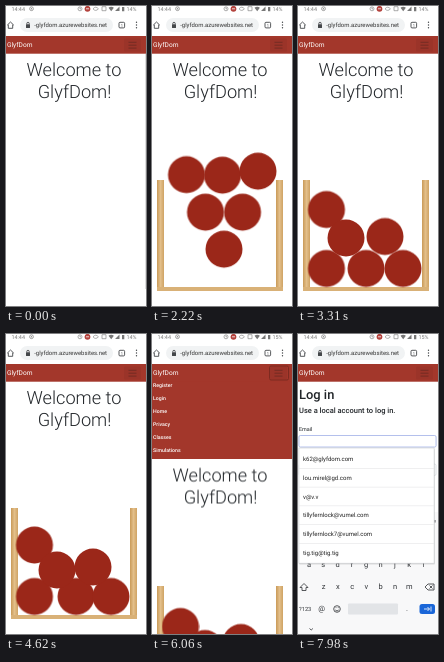
An HTML page for the animation above (8000 ms loop, 140 by 300 pixels).

```html
<!DOCTYPE html>
<html lang="en">
<head>
<meta charset="utf-8">
<title>GlyfDom</title>
<style>
  html, body { margin: 0; width: 100%; height: 100%; overflow: hidden; background: #fff; }
  svg { display: block; width: 140px; height: 300px; font-family: Roboto, sans-serif; text-rendering: geometricPrecision; }
  .line { fill: none; stroke: #44474a; stroke-width: .9; }
  .field { fill: #fff; stroke: #ced4da; stroke-width: .7; }
  .title { font-size: 18.2px; font-weight: 300; fill: #212529; text-anchor: middle; }
  .menu { font-size: 5.2px; font-weight: 500; fill: #fff; }
  .label { font-size: 5.4px; fill: #212529; }
  .mail { font-size: 6px; fill: #222; }
  .key { font-size: 7.5px; fill: #33363a; text-anchor: middle; }
  .status { font-size: 5.4px; fill: #777; }
</style>
</head>
<body>
<svg viewBox="0 0 140 300">
  <defs>
    <linearGradient id="wood">
      <stop offset="0" stop-color="#c99a58"/>
      <stop offset=".5" stop-color="#e3bf8a"/>
      <stop offset="1" stop-color="#cfa364"/>
    </linearGradient>
  </defs>
  <rect width="140" height="300" fill="#fff"/>

  <g id="home">
    <g id="content">
      <text class="title" x="68" y="70">Welcome to</text>
      <text class="title" x="68.5" y="92">GlyfDom!</text>
      <g id="sim">
        <rect x="5" y="174" width="7" height="111" fill="url(#wood)"/>
        <rect x="124" y="174" width="7" height="111" fill="url(#wood)"/>
        <rect x="5" y="281" width="126" height="4" fill="#d9b177"/>
        <g id="balls" fill="#9b2719"></g>
      </g>
    </g>
    <g id="drawer">
      <rect y="-48" width="140" height="95" fill="#a3372b"/>
      <g id="menu" class="menu"></g>
    </g>
    <rect id="scrollbar" x="139" y="48" width="1" height="235" fill="#ddd"/>
  </g>

  <g id="login">
    <rect y="28" width="140" height="272" fill="#fff"/>
    <text x="1" y="65.2" font-size="12.900" font-weight="500" fill="#212529">Log in</text>
    <text x="1" y="78.500" font-size="7.500" font-weight="500" fill="#212529">Use a local account to log in.</text>
    <text class="label" x="1" y="97">Email</text>
    <rect class="field" x="1" y="101.500" width="137" height="11.500" rx="1.500"/>
    <text class="label" x="1" y="125">Password</text>
    <rect class="field" x="1" y="130" width="137" height="11.500" rx="1.500"/>
    <rect class="field" x="1.500" y="148" width="4" height="4" rx=".8"/>
    <text class="label" x="8" y="152">Remember me?</text>
    <rect x="1" y="159" width="22" height="12" rx="1.500" fill="#a3372b"/>
    <text class="menu" x="5" y="167">Log in</text>
    <g id="focus">
      <rect x="1" y="101.500" width="137" height="11.500" rx="1.500" fill="#fff" stroke="#a5b4ea" stroke-width=".8"/>
      <rect id="caret" x="5" y="105" width=".8" height="6" fill="#222"/>
    </g>
    <g id="keyboard">
      <rect y="178" width="140" height="122" fill="#f8f8f9"/>
      <g id="keys" class="key"></g>
      <path class="line" d="M2 253.500l4-4 4 4H8v3H4v-3zM127 253l3-3h6v6h-6zM131.500 251.500l3 3m0-3l-3 3"/>
      <text x="1" y="277.300" font-size="5.700" fill="#33363a">?123</text>
      <circle class="line" cx="39" cy="275" r="3.300"/>
      <path class="line" d="M37.300 276q1.700 2 3.400 0M37.600 273.600h.8m1.400 0h.8"/>
      <rect x="50" y="269.500" width="50" height="11" rx="1" fill="#e2e4e7"/>
      <rect x="121.500" y="270" width="15.500" height="10" rx="2.500" fill="#1a66d8"/>
      <path d="M126 275h5.500m-2-2l2 2-2 2m3.500-4.500v5" fill="none" stroke="#fff" stroke-width=".8"/>
      <path class="line" d="M11.500 294.500l1.700 1.500 1.700-1.500M137 186v2.500"/>
    </g>
    <g id="suggest">
      <rect x="1" y="115" width="136" height="115.500" rx="1" fill="#000" opacity=".12"/>
      <rect x=".9" y="114" width="135.200" height="115.200" fill="#fff" stroke="#c9ccd0" stroke-width=".6"/>
      <g id="mails" class="mail"></g>
    </g>
  </g>

  <rect width="140" height="30" fill="#fff"/>
  <g id="bar">
    <rect y="30" width="140" height="17.700" fill="#a3372b"/>
    <text x="1" y="41" font-size="6.600" fill="#fff">GlyfDom</text>
    <rect x="118" y="32.500" width="17" height="13" rx="1.500" fill="#9b3429"/>
    <rect id="ring" x="117.500" y="32" width="19" height="14" rx="1.500" fill="none" stroke="#7d2a20"/>
    <path d="M122.500 36.300h8m-8 2.900h8m-8 2.900h8" stroke="#6b2a22" stroke-width=".8"/>
  </g>

  <g transform="translate(0 -.6)">
    <text class="status" x="5.500" y="5.300">14:44</text>
    <circle cx="25.500" cy="3.300" r="1.900" fill="none" stroke="#888" stroke-width=".8"/>
    <circle cx="25.500" cy="3.300" r=".7" fill="#888"/>
    <g fill="none" stroke="#888" stroke-width=".7">
      <circle cx="74" cy="3.400" r="2"/>
      <path d="M74 2v1.500h1M87 3.400q2.700-3.200 5.400 0-2.700 3.200-5.400 0zM96 1.300h4v4h-4z"/>
    </g>
    <circle cx="81.500" cy="3.400" r="2.900" fill="#b3423d"/>
    <path d="M80 3.400h3" stroke="#fff" stroke-width=".8"/>
    <path d="M102.500 2.300q2.700-2 5.400 0l-2.700 3.500zM109 5.700l4.500-4.500v4.500zM116 1.500h2.300v4.300H116z" fill="#777"/>
    <text id="low" class="status" x="120.500" y="5.300">14%</text>
    <text id="high" class="status" x="120.500" y="5.300">15%</text>
  </g>

  <rect x="14" y="12" width="93" height="14" rx="7" fill="#f1f3f4"/>
  <path class="line" d="M1.200 19.200L4.500 16l3.300 3.200M2.300 18.700v3.600h4.400v-3.600"/>
  <rect x="20" y="18.300" width="4" height="3.700" rx=".5" fill="#44474a"/>
  <path class="line" d="M20.800 18.500v-1a1.200 1.200 0 0 1 2.400 0v1"/>
  <text x="28.200" y="21.200" font-size="5.950" fill="#333">-glyfdom.azurewebsites.net</text>
  <rect class="line" x="113" y="16.300" width="5.600" height="5.600" rx="1"/>
  <text x="115.800" y="20.700" font-size="4" text-anchor="middle" fill="#44474a">1</text>
  <path d="M130.500 16.300v.01m0 2.690v.01m0 2.690v.01" stroke="#44474a" stroke-width="1.400" stroke-linecap="round"/>
</svg>

<script>
const LOOP = 8000;
const $ = id => document.getElementById(id);

function add(parent, tag, attrs, text = '') {
  const el = document.createElementNS('http://www.w3.org/2000/svg', tag);
  for (const name in attrs) el.setAttribute(name, attrs[name]);
  el.textContent = text;
  return parent.appendChild(el);
}

// steps: [time, css, easing to the next step]
function play(el, steps) {
  const frames = steps.map(([time, css, easing = 'linear']) => ({ offset: time / LOOP, easing, ...css }));
  el.animate(frames, { duration: LOOP, iterations: Infinity });
}

function show(id, from, to = LOOP) {
  const at = (time, opacity) => [time, { opacity }, 'step-end'];
  const steps = [at(0, from ? 0 : 1)];
  if (from) steps.push(at(from, 1));
  steps.push(at(to, to < LOOP ? 0 : 1));
  if (to < LOOP) steps.push(at(LOOP, 0));
  play($(id), steps);
}

const move = (x, y) => ({ transform: `translate(${x}px, ${y}px)` });

function slide(id, start, end, from, to, easing = 'ease') {
  play($(id), [[0, move(0, from)], [start, move(0, from), easing], [end, move(0, to)], [LOOP, move(0, to)]]);
}

['Register', 'Login', 'Home', 'Privacy', 'Classes', 'Simulations'].forEach((name, i) =>
  add($('menu'), 'text', { x: 1, y: -25 + i * 13 }, name));

['k62@glyfdom.com', 'lou.mirel@gd.com', 'v@v.v', 'tillyfernlock@vumel.com',
 'tillyfernlock7@vumel.com', 'tig.tig@tig.tig'].forEach((mail, i) => {
  const y = 127 + i * 18.75;
  add($('mails'), 'text', { x: 5, y }, mail);
  if (i) add($('mails'), 'rect', { x: 1, y: y - 11.7, width: 135, height: 0.6, fill: '#e4e4e6' });
});

[['qwertyuiop', 4, 209], ['asdfghjkl', 11, 231], ['zxcvbnm', 25.5, 253]].forEach(([row, x, y]) =>
  [...row].forEach((key, i) => add($('keys'), 'text', { x: x + i * 14.3, y: y + 2.3 }, key)));
add($('keys'), 'text', { x: 23.5, y: 277.3 }, '@');
add($('keys'), 'text', { x: 109, y: 277.3 }, '.');

// Free fall, then positions while the pile spreads and settles
const DROP = 50;
const times = [2220, 2340, 2520, 2820, 3310, 4620, 6060];
const paths = [
  [72, 243, 72, 262, 71, 262.5, 69, 262.5, 68, 262.5, 70, 262.5, 71, 262.5],
  [53.5, 206, 51, 226, 42, 240, 29, 262, 28.5, 262.5, 28.5, 262.5, 28.5, 262.5],
  [90.5, 206, 93, 226, 101, 240, 105, 262, 105, 262.5, 105, 262.5, 105, 262.5],
  [34.5, 168.5, 34, 184, 32, 200, 29, 204, 28.5, 203.5, 28.5, 211, 28.5, 215],
  [70.5, 169, 70, 187, 68, 207, 59, 227, 48, 232, 51, 236, 53, 237],
  [106, 165, 105, 182, 103, 203, 90, 228, 87, 230.5, 87, 233, 89, 231]
];
for (const p of paths) {
  const ball = add($('balls'), 'circle', { r: 18.5 });
  const top = move(p[0], p[1] - DROP);
  const steps = [[0, top], [1550, top, 'cubic-bezier(.33, 0, .67, .33)']];
  times.forEach((time, i) => steps.push([time, move(p[2 * i], p[2 * i + 1])]));
  steps.push([LOOP, move(p[12], p[13])]);
  play(ball, steps);
}

show('scrollbar', 0, 130);
show('sim', 1550);
show('low', 0, 5500);
show('high', 5500);
show('ring', 5580, 6460);
slide('drawer', 5600, 5950, 0, 78);
slide('content', 5600, 5950, 0, 77.5);
show('login', 6460);
show('focus', 7080);
slide('keyboard', 7290, 7570, 122, 0, 'ease-out');
show('suggest', 7710);
show('caret', 0, 7980);
</script>
</body>
</html>
```
